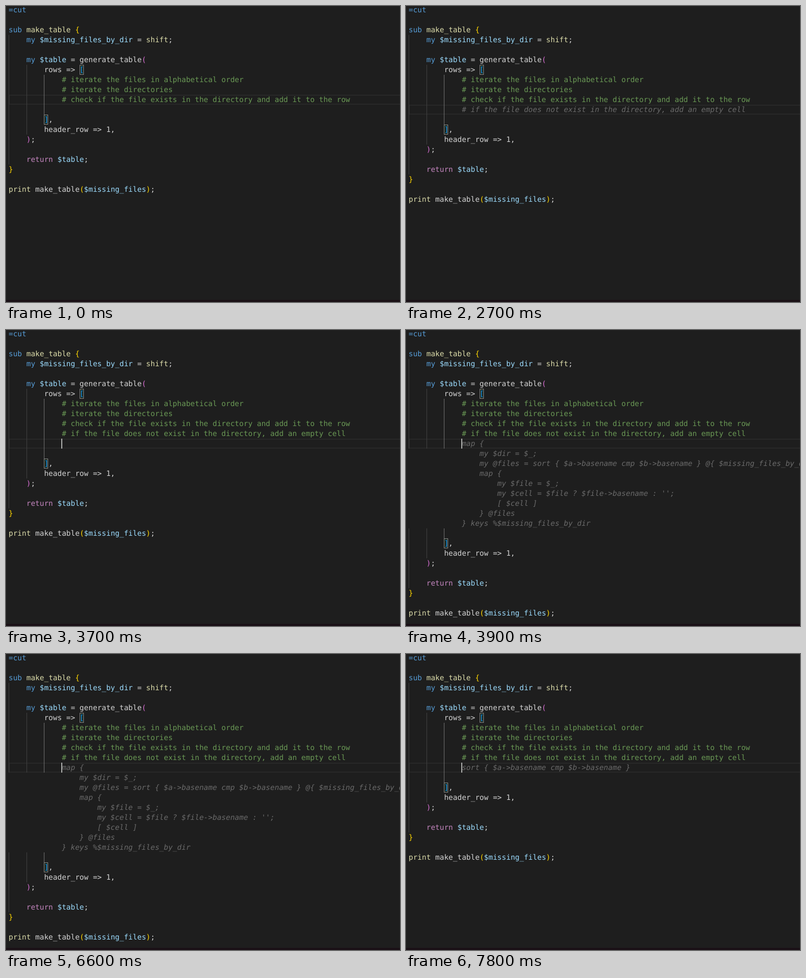
Animation of 749x564 px, one loop 8000 ms. Source, as an HTML page:

```html
<!DOCTYPE html>
<html lang="en">
<head>
<meta charset="utf-8">
<title>Code editor suggestions</title>
<style>
  html, body { margin: 0; width: 100%; height: 100%; overflow: hidden; background: #1e1e1e; }
  svg { display: block; width: 749px; height: 564px; }
  text {
    font: 14px "DejaVu Sans Mono", monospace;
    white-space: pre;
    text-rendering: geometricPrecision;
    fill: #d4d4d4;
  }
  .keyword { fill: #569cd6; }
  .control { fill: #c586c0; }
  .func { fill: #dcdcaa; }
  .variable { fill: #9cdcfe; }
  .comment { fill: #6a9955; }
  .gold { fill: #ffd700; }
  .orchid { fill: #da70d6; }
  .blue { fill: #179fff; }
  .ghost { fill: #6a6a6a; font-style: italic; }
</style>
</head>
<body>
<svg id="stage" viewBox="0 0 749 564"></svg>
<script>
const LOOP = 8000;
const LINE = 19;
const LEFT = 5;
const CHAR = 14 * 1233 / 2048;
const INSERT_ROW = 10;
const stage = document.getElementById('stage');

const lineTop = row => row * LINE - 2;
const colX = col => LEFT + col * CHAR;
const escapeText = s => s.replace(/&/g, '&amp;').replace(/</g, '&lt;').replace(/>/g, '&gt;');

// Each line: indent column, then [class, text] tokens.
const head = [
  [0, ['keyword', '=cut']],
  [0],
  [0, ['keyword', 'sub'], ['', ' '], ['func', 'make_table'], ['', ' '], ['gold', '{']],
  [4, ['keyword', 'my'], ['', ' '], ['variable', '$missing_files_by_dir'], ['', ' = '], ['func', 'shift'], ['', ';']],
  [0],
  [4, ['keyword', 'my'], ['', ' '], ['variable', '$table'], ['', ' = generate_table'], ['orchid', '(']],
  [8, ['', 'rows => '], ['blue', '[']],
  [12, ['comment', '# iterate the files in alphabetical order']],
  [12, ['comment', '# iterate the directories']],
  [12, ['comment', '# check if the file exists in the directory and add it to the row']]
];
const tail = [
  [0],
  [8, ['blue', ']'], ['', ',']],
  [8, ['', 'header_row => 1,']],
  [4, ['orchid', ')'], ['', ';']],
  [0],
  [4, ['control', 'return'], ['', ' '], ['variable', '$table'], ['', ';']],
  [0, ['gold', '}']],
  [0],
  [0, ['func', 'print'], ['', ' make_table'], ['gold', '('], ['variable', '$missing_files'], ['gold', ')'], ['', ';']]
];
const emptyCell = '# if the file does not exist in the directory, add an empty cell';
const ghostLines = (...lines) => lines.map(([indent, text]) => [indent, ['ghost', text]]);
const emptyCellGhost = ghostLines([12, emptyCell]);
const mapGhost = ghostLines(
  [12, 'map {'],
  [16, 'my $dir = $_;'],
  [16, 'my @files = sort { $a->basename cmp $b->basename } @{ $missing_files_by_dir };'],
  [16, 'map {'],
  [20, 'my $file = $_;'],
  [20, "my $cell = $file ? $file->basename : '';"],
  [20, '[ $cell ]'],
  [16, '} @files'],
  [12, '} keys %$missing_files_by_dir']
);
const sortGhost = ghostLines([12, 'sort { $a->basename cmp $b->basename }']);
const blank = [[0]];
const accepted = [[12, ['comment', emptyCell]]];

// added: typed lines, ghost: suggestion at the caret line, row/col: caret position
const scenes = [
  { at: 0, added: [], ghost: [], row: 9, col: 77 },
  { at: 1000, added: blank, ghost: [], row: 10, col: 12 },
  { at: 1300, added: blank, ghost: emptyCellGhost, row: 10, col: 12 },
  { at: 3100, added: accepted, ghost: [], row: 10, col: 76 },
  { at: 3700, added: [...accepted, ...blank], ghost: [], row: 11, col: 12 },
  { at: 3900, added: [...accepted, ...blank], ghost: mapGhost, row: 11, col: 12 },
  { at: 6800, added: [...accepted, ...blank], ghost: sortGhost, row: 11, col: 12 }
];
// The caret starts hidden and flips at each of these times.
const blinks = [500, 1500, 2000, 2700, 3100, 3600, 3700, 4100, 4800, 5300, 5600, 6100, 6600, 7100, 7800];

function rect(x, y, width, height, fill, extra = '') {
  return `<rect x="${x}" y="${y}" width="${width}" height="${height}" fill="${fill}" ${extra}/>`;
}

function codeLine([indent, ...tokens], row) {
  if (!tokens.length) return '';
  const spans = tokens.map(([cls, s]) => `<tspan class="${cls}">${escapeText(s)}</tspan>`).join('');
  return `<text x="${colX(indent)}" y="${lineTop(row) + 14}">${spans}</text>`;
}

function bracketBox(row, col) {
  const x = Math.round(colX(col)) + 0.5;
  return rect(x, lineTop(row) + 0.5, 7, LINE - 1, '#006400',
    'fill-opacity=".1" stroke="#888" stroke-width="1"');
}

function guide(col, from, to, color, gapStart, gapEnd) {
  const x = Math.round(colX(col));
  const part = (a, b) => rect(x, lineTop(a), 1, (b - a) * LINE, color);
  return gapEnd > gapStart ? part(from, gapStart) + part(gapEnd, to) : part(from, to);
}

function draw(scene, caretOn) {
  const { added, ghost, row, col } = scene;
  const extraRows = Math.max(0, ghost.length - 1);
  const shift = added.length + extraRows;
  const gap = [row + 1, row + 1 + extraRows];
  const y = lineTop(row);
  const parts = [
    rect(0, 0, 749, 564, '#1e1e1e'),
    rect(LEFT + 1, y + 1, 760, LINE - 2, 'none', 'stroke="#282828" stroke-width="2"'),
    guide(0, 3, 16 + shift, '#404040', ...gap),
    guide(4, 6, 13 + shift, '#404040', ...gap),
    guide(8, 7, 11 + shift, '#707070', ...gap),
    bracketBox(6, 16),
    bracketBox(11 + shift, 8),
    ...head.map(codeLine),
    ...added.map((line, i) => codeLine(line, INSERT_ROW + i)),
    ...ghost.map((line, i) => codeLine(line, row + i)),
    ...tail.map((line, i) => codeLine(line, INSERT_ROW + shift + i))
  ];
  if (caretOn) parts.push(rect(Math.round(colX(col)) - 1, y, 2, LINE, '#aeafad'));
  parts.push(rect(0, 560, 749, 4, '#1a1016'));
  stage.innerHTML = parts.join('');
}

let shown = '';
function update(now) {
  const t = now % LOOP;
  const index = scenes.filter(s => s.at <= t).length - 1;
  const caretOn = blinks.filter(b => b <= t).length % 2 === 1;
  const key = index + ':' + caretOn;
  if (key !== shown) {
    draw(scenes[index], caretOn);
    shown = key;
  }
}

const start = performance.now();
function tick() {
  update(performance.now() - start);
  requestAnimationFrame(tick);
}
tick();
</script>
</body>
</html>
```
